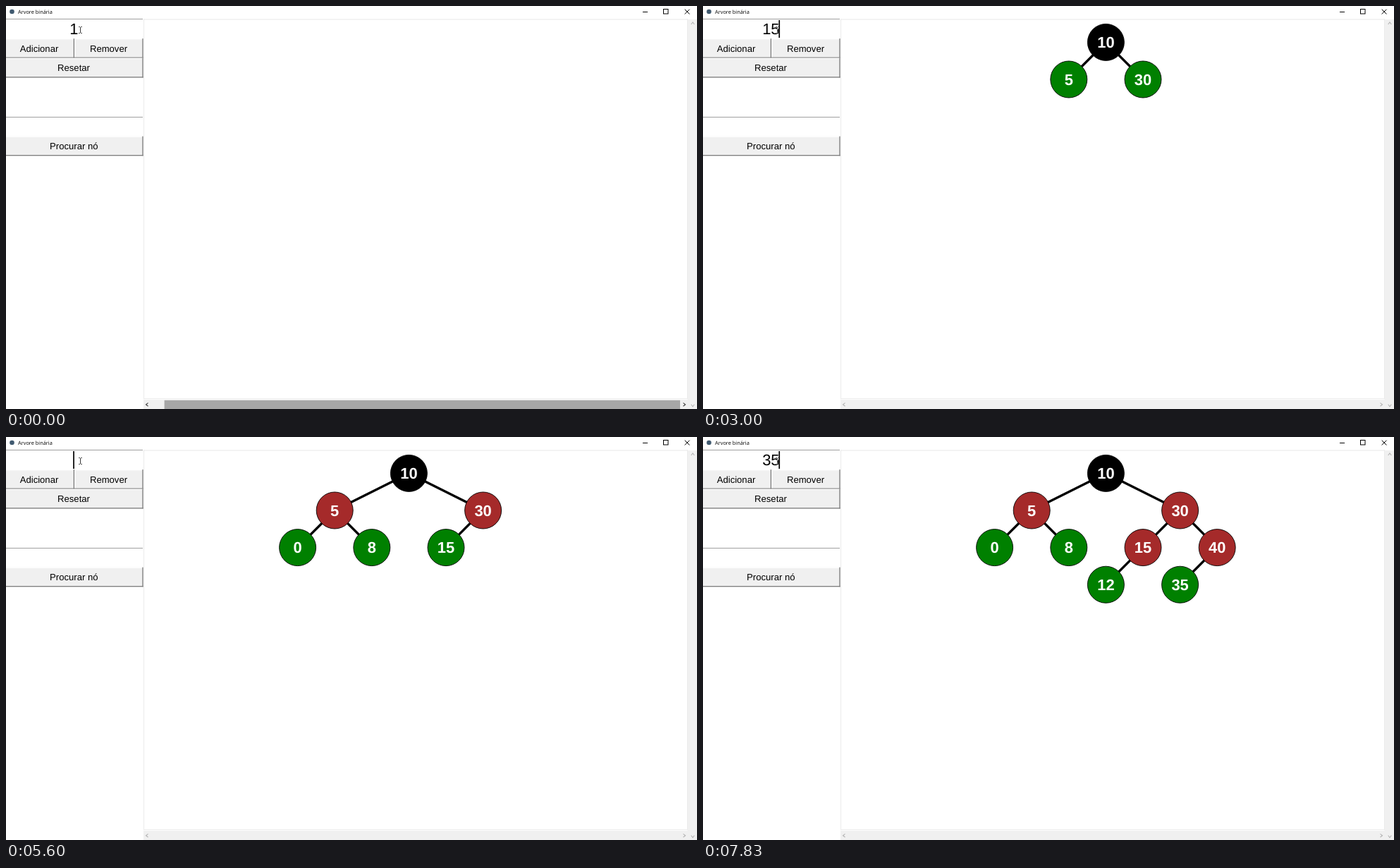
These frames come from a looping animation (980x571 px, 8000 ms). An HTML page with a canvas:

```html
<!DOCTYPE html>
<html lang="pt">
<head>
<meta charset="utf-8">
<title>Arvore binária</title>
<style>
html, body { margin: 0; width: 100%; height: 100%; overflow: hidden; background: #fff; }
canvas { display: block; }
</style>
</head>
<body>
<canvas id="stage" width="980" height="571"></canvas>
<script>
const ctx = document.getElementById('stage').getContext('2d');
ctx.textRendering = 'geometricPrecision';
const LOOP = 8000;
const SANS = '"Liberation Sans", Arial, sans-serif';
const STEP = 52.6, ROOT_X = 571.4, ROOT_Y = 51.4;
const ROW = 27.7, TOP = 18.4, BEVEL = 1.2;

// Entry contents: [start time, text]
const typed = [
  [0, '1'], [80, '10'], [480, ''], [1060, '5'], [1380, ''],
  [1860, '3'], [1940, '30'], [2340, ''], [2680, '1'], [2840, '15'], [3160, ''],
  [4060, '0'], [4300, ''], [5020, '8'], [5280, ''],
  [5840, '1'], [5920, '12'], [6160, ''], [6950, '4'], [7030, '40'], [7270, ''],
  [7590, '3'], [7670, '35']
];

// Tree nodes: value, time added, parent, column, row
const nodes = [
  [10, 400, null, 0, 0], [5, 1300, 10, -2, 1], [30, 2260, 10, 2, 1],
  [15, 3080, 30, 1, 2], [0, 4220, 5, -3, 2], [8, 5200, 5, -1, 2],
  [12, 6080, 15, 0, 3], [40, 7190, 30, 3, 2], [35, 7830, 40, 2, 3]
].map(([value, born, parent, col, row]) => ({ value, born, parent, col, row }));
const byValue = new Map(nodes.map(n => [n.value, n]));
const FIRST_CHILD = byValue.get(5).born, WIDEN = byValue.get(8).born;

function rect(x, y, w, h, color) {
  ctx.fillStyle = color;
  ctx.fillRect(x, y, w, h);
}

function path(points, color, width) {
  ctx.beginPath();
  points.forEach(([x, y]) => ctx.lineTo(x, y));
  ctx.strokeStyle = color;
  ctx.lineWidth = width;
  ctx.stroke();
}

function label(text, x, y, font, color = '#000', align = 'center') {
  ctx.font = font;
  ctx.textAlign = align;
  ctx.fillStyle = color;
  ctx.fillText(text, x, y);
}

// Raised button on the panel grid
function button(text, row, x, w, textX) {
  const y = TOP + row * ROW;
  rect(x, y, w, ROW, '#f0f0f0');
  rect(x, y, w, BEVEL, '#fff');
  if (x) rect(x, y, BEVEL, ROW, '#fff');
  rect(x, y + ROW - BEVEL, w, BEVEL, '#747474');
  rect(x + w - BEVEL, y, BEVEL, ROW, '#747474');
  label(text, textX, y + 18.5, '13.1px ' + SANS);
}

function arrow(x, y, dx, dy, color) {
  const tip = 1.5, wing = 2.3;
  path([
    [x - dx * tip - dy * wing, y - dy * tip - dx * wing],
    [x + dx * tip, y + dy * tip],
    [x - dx * tip + dy * wing, y - dy * tip + dx * wing]
  ], color, 1.1);
}

function drawTitleBar() {
  ctx.beginPath();
  ctx.arc(8.5, 8, 3.3, 0, 7);
  ctx.fillStyle = '#405a70';
  ctx.fill();
  label('Arvore binária', 17, 11, '7.4px "Open Sans", sans-serif', '#000', 'left');
  rect(903, 8, 7, 1, '#000');
  ctx.strokeStyle = '#000';
  ctx.lineWidth = 1;
  ctx.strokeRect(932.5, 4.5, 6.5, 6.5);
  path([[962.7, 4.7], [969.5, 11.5]], '#000', 1);
  path([[969.5, 4.7], [962.7, 11.5]], '#000', 1);
}

function drawScrollbars(active) {
  const border = '#ebebeb';
  rect(195, TOP, 772, BEVEL, border);
  rect(195, TOP, 1, 539, border);
  rect(966, TOP, 1, 539, border);
  rect(195, 556, 772, 1, border);
  rect(967, 19, 13, 552, '#f0f0f0');
  rect(195, 558, 772, 13, '#f0f0f0');
  arrow(974, 24.5, 0, -1, '#b4b4b4');
  arrow(974, 566, 0, 1, '#b4b4b4');
  const color = active ? '#404040' : '#b4b4b4';
  if (active) rect(224.6, 558.6, 731.4, 12.4, '#a6a6a6');
  arrow(200, 564.7, -1, 0, color);
  arrow(962, 564.7, 1, 0, color);
}

function drawPanel(t) {
  rect(0, 18, 194, 1, '#a0a0a0');
  rect(0, 157, 194, 1, '#a0a0a0');
  button('Adicionar', 1, 0, 97, 47);
  button('Remover', 1, 97, 97.5, 145.5);
  button('Resetar', 2, 0, 194.5, 96);
  button('Procurar nó', 6, 0, 194.5, 96.3);

  const text = typed.filter(e => e[0] <= t).pop()[1];
  label(text, 96.3, 40.2, '21.9px ' + SANS);
  const phase = t % 900;
  if (phase >= 200 && phase < 800) {
    rect(95.2 + ctx.measureText(text).width / 2, 20, 1.7, 25, '#000');
  }
}

function drawPointer() {
  ctx.globalCompositeOperation = 'difference';
  rect(105, 30, 1, 8, '#c8c8c8');
  for (const y of [29, 38]) {
    rect(103, y, 2, 1, '#a8a8a8');
    rect(106, y, 2, 1, '#a8a8a8');
  }
  ctx.globalCompositeOperation = 'source-over';
}

function place(node, t) {
  let col = node.col;
  // Both halves sit one column closer until the tree widens.
  if (t < WIDEN && node.row) col -= Math.sign(node.col);
  return [ROOT_X + col * STEP, ROOT_Y + node.row * STEP];
}

function drawTree(t) {
  const shown = nodes.filter(n => n.born <= t);
  for (const n of shown) {
    if (n.parent !== null) path([place(byValue.get(n.parent), t), place(n, t)], '#000', 3.4);
  }
  for (const n of shown) {
    const [x, y] = place(n, t);
    const inner = shown.some(c => c.parent === n.value);
    ctx.beginPath();
    ctx.arc(x, y, 26, 0, Math.PI * 2);
    ctx.fillStyle = n.parent === null ? '#000' : inner ? '#a52a2a' : '#008000';
    ctx.fill();
    ctx.strokeStyle = '#000';
    ctx.lineWidth = 0.9;
    ctx.stroke();
    label(n.value, x, y + 7.8, 'bold 21.9px ' + SANS, '#fff');
  }
}

function frame(now) {
  const t = now % LOOP;
  rect(0, 0, 980, 571, '#fff');
  drawTitleBar();
  drawScrollbars(t < FIRST_CHILD);
  drawPanel(t);
  drawTree(t);
  drawPointer();
  requestAnimationFrame(frame);
}
requestAnimationFrame(frame);
</script>
</body>
</html>
```
